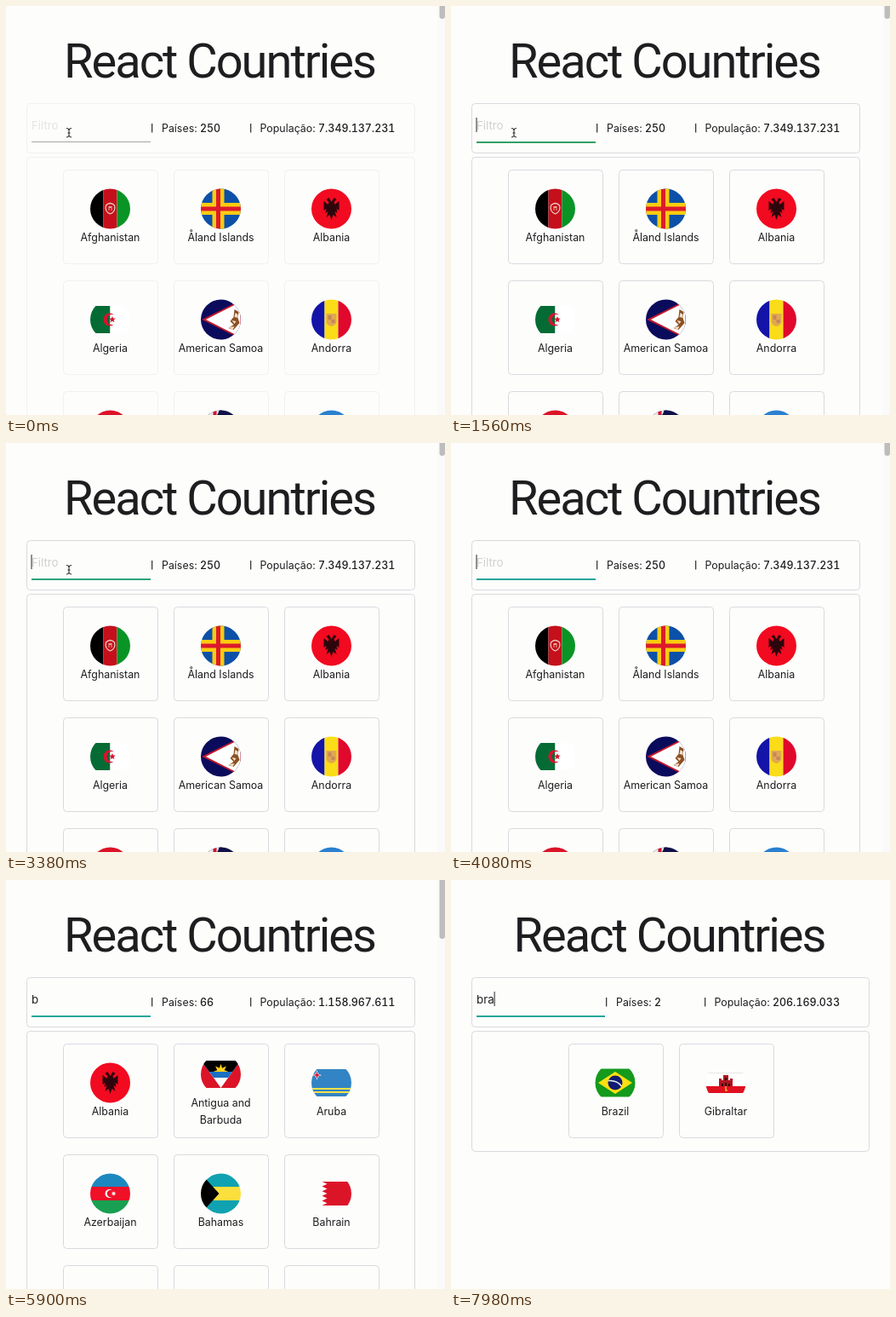
Recreate the animation shown at these times as an HTML page. Size 516 by 480 pixels, loop 8 s.

```html
<!DOCTYPE html>
<html lang="pt">
<head>
<meta charset="utf-8">
<title>React Countries</title>
<style>
  html, body { margin: 0; width: 100%; height: 100%; overflow: hidden; background: #fdfdfc; }
  svg { display: block; width: 516px; height: 480px; }
  text { font: 400 12.4px Inter, "Open Sans", sans-serif; fill: #1e1e20; }
  .title { font: 400 56px Roboto, Inter, sans-serif; letter-spacing: -2px; text-anchor: middle; }
  .name { text-anchor: middle; }
  .strong { font-weight: 500; font-variant-numeric: tabular-nums; }
  .typed { font-size: 13.3px; }
  .hint { font-size: 13.3px; fill: #d0d0cc; }
  .box { fill: none; stroke: #dadadf; }
</style>
</head>
<body>
<svg viewBox="0 0 516 480">
  <defs><clipPath id="disc"><circle r="23.5"/></clipPath></defs>
  <g id="page"></g>
  <text id="hint" class="hint" x="30" y="145">Filtro</text>
  <text id="typed" class="typed" x="30" y="145"></text>
  <rect id="line" x="30" y="159"/>
  <rect id="caret" y="131" width="1" height="17" fill="#222"/>
  <path id="mouse" d="M71 143.5q3 0 3 2q0-2 3-2M74 145v7M71 154q3 0 3-2q0 2 3 2M72.500 149h3" fill="none" stroke="#222"/>
</svg>
<script>
const LOOP = 8000, FOCUS = 1070, HIDE_MOUSE = 4000;
const KEYS = [[4200, 'b'], [6740, 'br'], [6940, 'bra']];
const $ = id => document.getElementById(id);

const rect = (x, y, w, h, fill) => `<rect x="${x}" y="${y}" width="${w}" height="${h}" fill="${fill}"/>`;
const path = (d, fill, extra = '') => `<path d="${d}" fill="${fill}" ${extra}/>`;
const dot = (x, y, r, fill, extra = '') => `<circle cx="${x}" cy="${y}" r="${r}" fill="${fill}" ${extra}/>`;
const columns = (...c) => c.map((f, i) => rect(-24 + 16 * i, -24, 16, 48, f)).join('');
const rows = (...c) => c.map((f, i) => rect(-24, -24 + 16 * i, 48, 16, f)).join('');

function star(x, y, points, outer, inner, fill) {
  const at = i => {
    const a = Math.PI * i / points - Math.PI / 2, r = i % 2 ? inner : outer;
    return `${(x + r * Math.cos(a)).toFixed(1)} ${(y + r * Math.sin(a)).toFixed(1)}`;
  };
  return path('M' + Array.from({ length: points * 2 }, (_, i) => at(i)).join('L') + 'z', fill);
}

const eagle = path('M0-8L-3-13L-6-11L-3-8L-4-5L-9-9L-9 2L-6 0L-7 5L-4 3L-6 10L-2 7L0 13L2 7L6 10L4 3L7 5L6 0L9 2L9-9L4-5L3-8L6-11L3-13z', '#2c060c');

const FLAGS = {
  'Afghanistan': columns('#000', '#c5101c', '#0a9426') +
    path('M-5-4Q-7 3 0 6Q7 3 5-4Q0-9-5-4z', 'none', 'stroke="#eccfc4" stroke-width="1.2"') + rect(-2, -3, 4, 5, '#e6a898') + rect(-1, -1, 2, 3, '#c5101c'),
  'Åland Islands': rect(-24, -24, 48, 48, '#0c50a8') + rect(-10, -24, 14, 48, '#fbcc10') + rect(-24, -7, 48, 14, '#fbcc10') +
    rect(-5.5, -24, 5, 48, '#dc1a2c') + rect(-24, -2.5, 48, 5, '#dc1a2c'),
  'Albania': rect(-24, -24, 48, 48, '#f20a20') + eagle,
  'Algeria': rect(-24, -16, 24, 32, '#056b34') + rect(0, -16, 24, 32, '#fff') +
    path('M4.500-5.500A7.500 7.500 0 1 0 4.500 5.500A6 6 0 1 1 4.500-5.500z', '#d8122f') + star(2.500, 0, 5, 4, 1.7, '#d8122f'),
  'American Samoa': rect(-24, -24, 48, 48, '#0b0b5c') + path('M-20 0L24-22V22z', '#fff', 'stroke="#c0182c" stroke-width="2"') +
    path('M16-12L21-9L20-2L22 4L15 12L9 10L15 6L11 2L15-3z', '#8a5020') + path('M17-8l3 2v4l-4-1zM9 9l7-1l-2 4zM13 1l5 1l-2 3z', '#f0dcc8'),
  'Andorra': columns('#1414a8', '#fbdc18', '#e0082c') +
    path('M-6-7H6V3Q5 7 0 8Q-5 7-6 3z', '#e0a850') + path('M-4-5h4v5h-4zM0 0h4v4h-4z', '#c4865a'),
  'Angola': rect(-24, -24, 48, 48, '#dc1228'),
  'Anguilla': rect(-24, -24, 48, 48, '#10104a') + path('M-24-24H0L-12-8z', '#e8e8ee') + path('M-9-24h4v7h-4z', '#d0142c') + path('M-2-24l4 0-6 8z', '#10104a'),
  'Antarctica': rect(-24, -24, 48, 48, '#2a80d0'),
  'Antigua and|Barbuda': rect(-24, -16, 48, 32, '#dc1428') + path('M-23-16H23L0 16z', '#fff') +
    path('M-23-16H23L8.600 4H-8.600z', '#1a70c4') + path('M-23-16H23L13.600-3H-13.600z', '#000') +
    `<clipPath id="sky"><path d="M-12-16H12V-3H-12z"/></clipPath><g clip-path="url(#sky)">${star(0, -3, 8, 9, 4.500, '#ffd21a')}</g>`,
  'Aruba': rect(-24, -16, 48, 32, '#3284c4') + rect(-24, 6, 48, 2, '#f4e04a') + rect(-24, 10, 48, 2, '#f4e04a') +
    star(-17, -9, 4, 5.500, 2.200, '#fff') + star(-17, -9, 4, 4.300, 1.600, '#d8142c'),
  'Azerbaijan': rows('#1d88c0', '#f01028', '#18a052') + dot(-1, 0, 5, '#fff') + dot(.5, 0, 4.200, '#f01028') + star(4, 0, 8, 3, 1.400, '#fff'),
  'Bahamas': rows('#10a2b0', '#fbdf3c', '#10a2b0') + path('M-24-24L-2 0L-24 24z', '#000'),
  'Bahrain': path('M24-14H-11' + 'l6 2.800l-6 2.800'.repeat(5) + 'H24z', '#dc1428'),
  'Brazil': rect(-24, -16.500, 48, 33, '#149a1c') + path('M-20 0L0-13L20 0L0 13z', '#ffe010') + dot(0, 0, 8.500, '#101c70') +
    path('M-8-2.500Q2-3.500 7.500 4', 'none', 'stroke="#e8f0f4" stroke-width="1.5"'),
  'Gibraltar': rect(-24, -12, 48, 16, '#fff') + rect(-24, 4, 48, 8, '#e01020') +
    path('M-23.500 4V-11.500H23.500V4', 'none', 'stroke="#e6e6e2"') +
    path('M-8 4V-5H-5V-3H-3V-9H3V-3H5V-5H8V4z', '#b01420') + path('M-5 4v-3h2v3zM-1 4v-4h2v4zM3 4v-3h2v3zM-1-6h2v3h-2z', '#2a0808') +
    path('M0 4V9H2', 'none', 'stroke="#f2c030" stroke-width="1.4"')
};
const all = Object.keys(FLAGS);
const BLANK = ['', '', ''];
const VIEWS = {
  full: { names: all.slice(0, 9), count: '250', people: '7.349.137.231', thumb: 15 },
  some: { names: ['Albania', ...all.slice(9, 14), ...BLANK], count: '66', people: '1.158.967.611', thumb: 69 },
  few: { names: ['Brazil', 'Gibraltar'], count: '2', people: '206.169.033', thumb: 0 }
};

const label = (x, y, s, cls = '') => `<text x="${x}" y="${y}" class="${cls}">${s}</text>`;
const box = (x, y, w, h) => `<rect class="box" x="${Math.round(x) + .5}" y="${y + .5}" width="${w}" height="${h}" rx="4"/>`;
const divider = x => rect(x, 138, 1.3, 10.5, '#3a3a3c');

function card(name, x, y) {
  const lines = name.split('|'), lift = (lines.length - 1) * 10;
  return box(x - 55.5, y, 111, 110) +
    `<g transform="translate(${x} ${y + 46 - lift})"><g clip-path="url(#disc)">${FLAGS[name] || ''}</g></g>` +
    lines.map((s, i) => label(x, y + 84 - lift + i * 19.5, s, 'name')).join('');
}

function drawPage({ names, count, people, thumb }) {
  // Without a scrollbar the page is wider.
  const wide = thumb ? 0 : 11, mid = 252.5 + wide / 2;
  const first = mid - 65 * (Math.min(3, names.length) - 1);
  const scrollbar = rect(507, 0, 9, 480, '#fafafa') + `<rect x="509.5" y="-6" width="6.5" height="${thumb + 6}" rx="3" fill="#bdbdbd"/>`;
  $('page').innerHTML =
    label(mid - 1.5, 83.5, 'React Countries', 'title') +
    box(24, 114, 456 + wide, 58) + box(24, 177, 456 + wide, thumb ? 400 : 141) +
    divider(171 + wide) + label(183 + wide, 147.5, 'Países:') + label(228 + wide, 147.5, count, 'strong') +
    divider(287 + wide) + label(298.5 + wide, 147.5, 'População:') + label(367 + wide, 147.5, people, 'strong') +
    names.map((n, i) => card(n, first + i % 3 * 130, 192 + Math.floor(i / 3) * 130)).join('') +
    (thumb ? scrollbar : '');
  $('line').setAttribute('width', 140 + wide);
}

const ramp = (t, from, to) => Math.min(1, Math.max(0, (t - from) / (to - from)));
const mix = (a, b, k) => `rgb(${a.map((v, i) => Math.round(v + (b[i] - v) * k))})`;
const show = (id, on) => $(id).setAttribute('visibility', on ? 'visible' : 'hidden');
const IDLE = [165, 165, 160], GREEN = [50, 160, 100], TEAL = [38, 166, 154];
let current;

function frame() {
  const t = performance.now() % LOOP;
  const [since, word] = KEYS.filter(k => k[0] <= t).pop() || [FOCUS, ''];
  const view = word === 'bra' ? 'few' : word ? 'some' : 'full';
  if (view !== current) drawPage(VIEWS[current = view]);

  // The outlines start faint and sharpen once the field has focus.
  const sharp = ramp(t, 1200, 1540);
  document.querySelectorAll('.box').forEach(b => b.setAttribute('stroke-opacity', .35 + .65 * sharp));
  $('hint').setAttribute('opacity', .55 + .45 * sharp);

  const typed = $('typed');
  if (typed.textContent !== word) typed.textContent = word;
  show('hint', !word);
  show('mouse', t < HIDE_MOUSE);
  show('caret', t >= since && (t - since) % 1000 < 500);
  $('caret').setAttribute('x', word ? 30 + typed.getComputedTextLength() : 29.5);

  const lit = ramp(t, FOCUS, FOCUS + 300);
  $('line').setAttribute('height', 1 + lit);
  $('line').setAttribute('fill', t < 2900 ? mix(IDLE, GREEN, lit) : mix(GREEN, TEAL, ramp(t, 2900, 4000)));
  requestAnimationFrame(frame);
}
frame();
</script>
</body>
</html>
```
